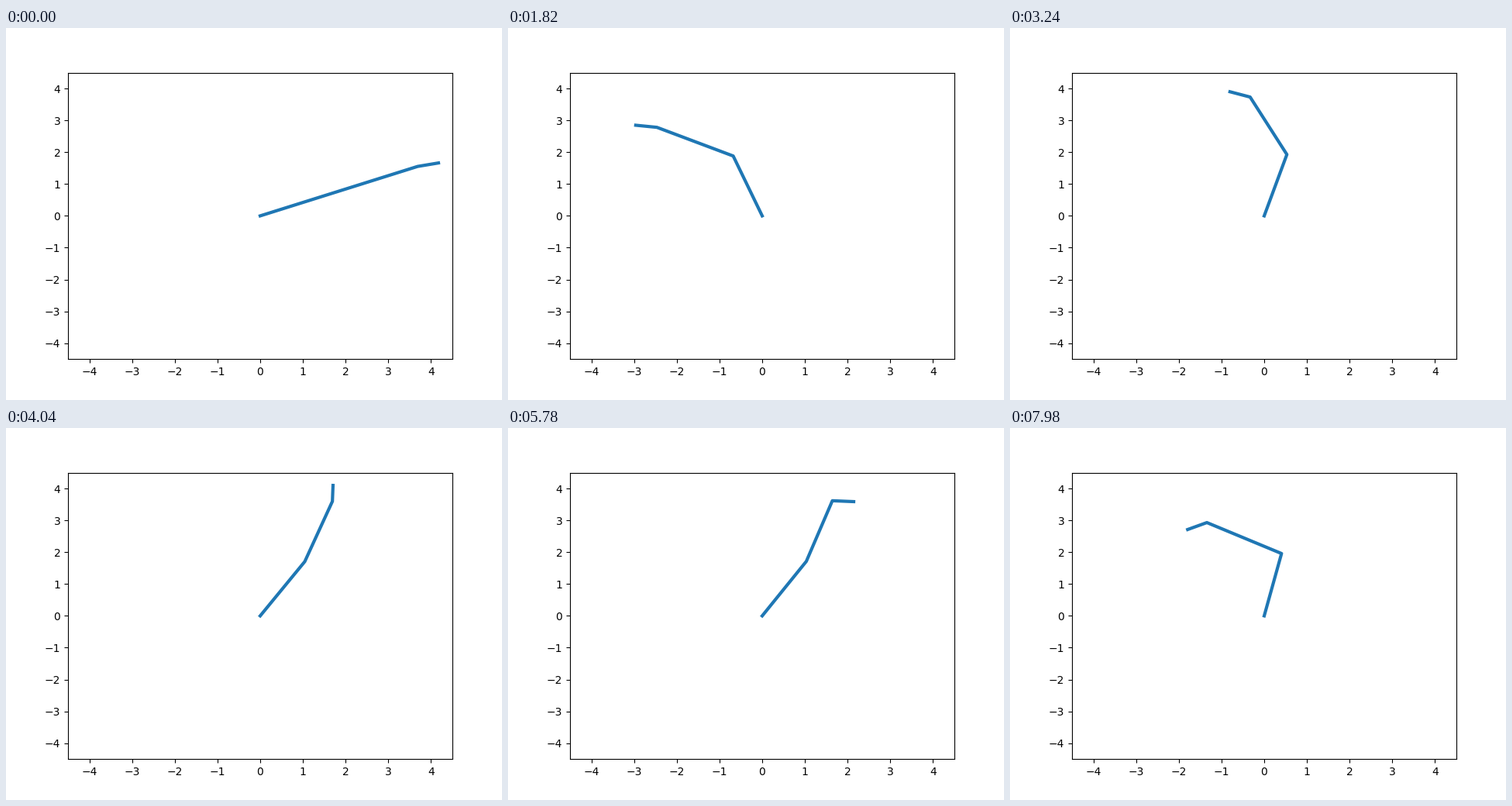
Recreate the animation shown at these times as a matplotlib script. Size 640x480 px, loop 8 s.

```python
import numpy as np
import matplotlib.pyplot as plt
from matplotlib.animation import FuncAnimation

FRAMES = 400
STEP_MS = 20
LENGTHS = np.array([2.0, 2.0, 0.5])

# key poses: time in s -> heading of upper arm, forearm and hand in degrees
POSES = {
    0.00: (22.85, 22.85, 12.6),
    0.82: (65, 83, 43),
    1.82: (109.85, 153.25, 172.4),
    2.46: (88.5, 156.3, 191),
    3.24: (74.6, 115.5, 160.6),
    4.10: (56, 67.6, 83),
    4.80: (24.8, 34.1, 30.8),
    5.78: (58.9, 72.25, -3.2),
    6.98: (109.4, 146.5, 128.7),
    7.98: (78.3, 150.9, 205.9),
}


def smooth_path(keys, values, t):
    """Natural cubic spline: a straight line plus cubic kernels at the keys."""
    line = np.stack([np.ones_like(keys), keys], axis=1)
    kernel = np.abs(keys[:, None] - keys) ** 3
    system = np.block([[kernel, line], [line.T, np.zeros((2, 2))]])
    weights = np.linalg.solve(system, np.vstack([values, np.zeros((2, 3))]))
    basis = np.column_stack([np.abs(t[:, None] - keys) ** 3, np.ones_like(t), t])
    return basis @ weights


times = np.arange(FRAMES) * STEP_MS / 1000
headings = np.radians(smooth_path(np.array(list(POSES)),
                                  np.array(list(POSES.values())), times))

fig, ax = plt.subplots(figsize=(6.4, 4.8), dpi=100)
ax.set(xlim=(-4.5, 4.5), ylim=(-4.5, 4.5),
       xticks=range(-4, 5), yticks=range(-4, 5))
arm, = ax.plot([], [], lw=3, color="tab:blue")


def draw(i):
    x = np.cumsum(LENGTHS * np.cos(headings[i]))
    y = np.cumsum(LENGTHS * np.sin(headings[i]))
    arm.set_data(np.r_[0, x], np.r_[0, y])
    return arm,


anim = FuncAnimation(fig, draw, frames=FRAMES, interval=STEP_MS,
                     repeat=True, repeat_delay=0, blit=True)
plt.show()
```
